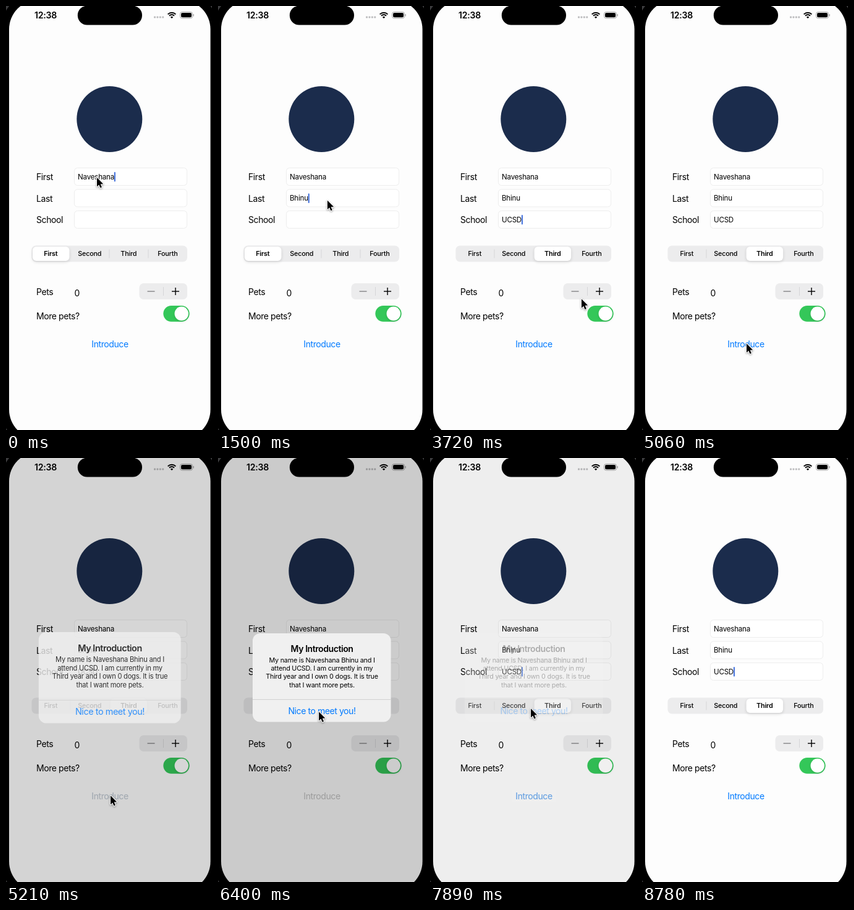
An HTML page with a canvas for the animation above (9.23 s loop, 333 by 682 pixels).

```html
<!DOCTYPE html>
<html lang="en">
<head>
<meta charset="utf-8">
<title>Introduction form</title>
<style>
  html, body { margin: 0; width: 100%; height: 100%; overflow: hidden; background: #000; }
  canvas { display: block; width: 100vw; height: 100vh; }
</style>
</head>
<body>
<canvas id="stage"></canvas>
<script>
const W = 333, H = 682, LOOP = 9230, STEP = 148.75;
const BLUE = '#007aff', GRAY = '#ececed', PAPER = '#fdfdfd';
const FIRST = 'Naveshana', LAST = 'Bhinu', SCHOOL = 'UCSD';
const canvas = document.getElementById('stage');
const ctx = canvas.getContext('2d');
const dpr = window.devicePixelRatio || 1;
canvas.width = W * dpr;
canvas.height = H * dpr;

const clamp = v => Math.min(1, Math.max(0, v));
const ramp = (t, from, to) => clamp((t - from) / (to - from));
const easeOut = u => 1 - (1 - u) ** 3;
const smooth = u => u * u * (3 - 2 * u);

const sampled = t => t < 291 ? 0 : 300 + Math.floor((t - 291) / STEP) * STEP;

function pointerAt(t) {
  let x = 147, y = 276;
  const glide = (from, to, toX, toY, ease = smooth) => {
    const u = ease(ramp(t, from, to));
    x += (toX - x) * u;
    y += (toY - y) * u;
  };
  glide(150, 600, 174, 302);
  glide(1350, 1790, 186, 347);
  glide(2080, 2670, 186, 371);
  glide(2670, 2970, 195, 396);
  glide(3270, 3870, 254, 485);
  glide(3870, 4460, 169, 543);
  glide(5360, 5950, 164, 444);
  glide(5950, 6850, 163, 403, easeOut);
  return [x, y];
}

// The pointer hides while keys are pressed and after the alert is gone.
const pointerHidden = t => t > 740 && t < 1480 || t > 2080 && t < 2670 || t > 8170;

const typed = (str, t, from, to) =>
  t < from ? '' : str.slice(0, 1 + Math.round((str.length - 1) * ramp(t, from, to) ** 2));

function caretAt(t) {
  const [field, since] = t < 590 ? [0, 0] : t < 1930 ? [1, 1200] : t < 7760 ? [2, 2380] : [2, 7770];
  return { field, alpha: clamp((560 - (t - since) % 1000) / 160) };
}

function box(x, y, w, h, r, fill, stroke) {
  ctx.beginPath();
  ctx.roundRect(x, y, w, h, r);
  if (fill) { ctx.fillStyle = fill; ctx.fill(); }
  if (stroke) { ctx.strokeStyle = stroke; ctx.lineWidth = 1; ctx.stroke(); }
}

function disc(x, y, r, fill) {
  ctx.beginPath();
  ctx.arc(x, y, r, 0, Math.PI * 2);
  ctx.fillStyle = fill;
  ctx.fill();
}

function line(x1, y1, x2, y2, color, width = 1) {
  ctx.beginPath();
  ctx.moveTo(x1, y1);
  ctx.lineTo(x2, y2);
  ctx.strokeStyle = color;
  ctx.lineWidth = width;
  ctx.stroke();
}

function text(str, x, y, { size = 14, weight = 400, color = '#000', align = 'left', track = -.42 } = {}) {
  ctx.font = `${weight} ${size}px Inter, sans-serif`;
  ctx.letterSpacing = track + 'px';
  ctx.textAlign = align;
  ctx.fillStyle = color;
  ctx.fillText(str, x, y);
  return ctx.measureText(str).width;
}

function shadowed(draw, blur, y, alpha) {
  ctx.save();
  ctx.shadowColor = `rgba(0,0,0,${alpha})`;
  ctx.shadowBlur = blur * dpr;
  ctx.shadowOffsetY = y * dpr;
  draw();
  ctx.restore();
}

function phone() {
  ctx.fillStyle = '#3c3c3e';
  ctx.fillRect(0, 0, W, H);
  box(-8, -22.5, 351.5, 731.5, 60, '#000');
  box(5, -9.5, 325.5, 705.5, 47, PAPER);
}

function statusBar() {
  text('12:38', 46, 20, { weight: 600, size: 14.2, track: -.3 });
  for (let i = 0; i < 4; i++) box(239 + i * 4.4, 16.5, 3, 3, 1, '#bdbdbf');
  ctx.strokeStyle = '#000';
  ctx.lineWidth = 2;
  for (const r of [9, 5.6]) {
    ctx.beginPath();
    ctx.arc(268, 19.7, r, Math.PI * 1.25, Math.PI * 1.75);
    ctx.stroke();
  }
  ctx.beginPath();
  ctx.moveTo(268, 20);
  ctx.arc(268, 20, 3, Math.PI * 1.25, Math.PI * 1.75);
  ctx.fillStyle = '#000';
  ctx.fill();
  box(281.5, 9.6, 20, 10.2, 3.2, null, '#a5a5a5');
  box(283, 11.1, 17, 7.2, 2, '#000');
  box(302.4, 13, 1.3, 3.6, .6, '#a5a5a5');
}

function fields(t) {
  const values = [FIRST, typed(LAST, t, 740, 1200), typed(SCHOOL, t, 2080, 2380)];
  const caret = caretAt(t);
  ['First', 'Last', 'School'].forEach((label, i) => {
    const y = 260.5 + i * 34.5;
    text(label, 49, y + 19.5);
    box(110.5, y, 182, 28, 5, '#fff', '#ededed');
    const width = text(values[i], 116, y + 18.2, { size: 11.6, track: -.22 });
    if (i === caret.field) {
      ctx.globalAlpha = caret.alpha;
      box(116 + width, y + 6.6, 1.8, 15.5, .8, '#2f62d9');
      ctx.globalAlpha = 1;
    }
  });
}

function segments(pos) {
  box(41.5, 385.5, 251.5, 26, 7, GRAY);
  for (let i = 1; i < 4; i++) {
    if (Math.abs(i - pos - .5) > .6) line(41 + i * 63, 391.5, 41 + i * 63, 405.5, '#d6d6d8');
  }
  shadowed(() => box(43 + pos * 62.8, 387, 59.5, 23, 6, '#fff'), 5, 1.8, .14);
  ['First', 'Second', 'Third', 'Fourth'].forEach((label, i) => {
    const weight = Math.abs(i - pos) < .5 ? 600 : 500;
    text(label, 72.3 + i * 63, 402.4, { size: 10.8, weight, align: 'center', track: -.2 });
  });
}

function form(t, shown) {
  disc(167.3, 182, 53, '#1b2c4c');
  fields(t);
  segments(2 * smooth(ramp(t, 2960, 3420)));

  text('Pets', 49, 464.8);
  text('0', 110.5, 467);
  box(215.5, 446, 77.5, 26, 7, GRAY);
  line(254.5, 452, 254.5, 466, '#d6d6d8');
  line(228.5, 459, 240.5, 459, '#858587', 1.4);
  line(268, 459, 280, 459, '#000', 1.4);
  line(274, 453, 274, 465, '#000', 1.4);

  text('More pets?', 49, 504.2);
  box(254.3, 482, 42.3, 25.7, 12.85, '#34c759');
  shadowed(() => disc(283.7, 494.8, 11.2, '#fff'), 4, 1.5, .12);

  text('Introduce', 168, 549, { align: 'center', color: BLUE });
  if (shown) {
    ctx.globalAlpha = shown;
    box(132, 534, 72, 20, 0, PAPER);
    text('Introduce', 168, 549, { align: 'center', color: '#c3c3c3' });
    ctx.globalAlpha = 1;
  }
}

function alertPanel(shown, scale) {
  ctx.save();
  ctx.globalAlpha = shown;
  ctx.translate(168, 353);
  ctx.scale(scale, scale);
  ctx.translate(-168, -353);
  box(56, 282, 223.5, 142.5, 12, '#f0f0f0');
  text('My Introduction', 168, 312, { weight: 600, align: 'center' });
  [
    `My name is ${FIRST} ${LAST} and I`,
    'attend UCSD. I am currently in my',
    'Third year and I own 0 dogs. It is true',
    'that I want more pets.'
  ].forEach((row, i) => text(row, 168, 328.8 + i * 13.3, { size: 10.8, align: 'center', track: -.22 }));
  line(56, 388.5, 279.5, 388.5, '#cfcfcf', .9);
  text('Nice to meet you!', 168, 411.7, { color: BLUE, align: 'center' });
  ctx.restore();
}

function arrow(x, y) {
  ctx.save();
  ctx.translate(x, y);
  ctx.beginPath();
  ctx.moveTo(0, 0);
  for (const [px, py] of [[0, 14.4], [3.3, 11.4], [5.5, 16.6], [7.9, 15.6], [5.7, 10.5], [10.2, 10.3]]) ctx.lineTo(px, py);
  ctx.closePath();
  ctx.lineJoin = 'round';
  ctx.strokeStyle = '#fff';
  ctx.lineWidth = 2;
  shadowed(() => ctx.stroke(), 3, 1, .4);
  ctx.fillStyle = '#000';
  ctx.fill();
  ctx.restore();
}

function draw(t) {
  const entered = easeOut(ramp(t, 5060, 5420));
  const shown = entered * (1 - easeOut(ramp(t, 7740, 8170)));
  ctx.setTransform(dpr, 0, 0, dpr, 0, 0);
  phone();
  form(t, shown);
  statusBar();
  ctx.fillStyle = `rgba(0,0,0,${.2 * shown})`;
  ctx.fillRect(5, 0, 325.5, H);
  box(115.8, -.4, 104.2, 30.8, 15.4, '#000');
  if (shown) alertPanel(shown, 1 + .14 * (1 - entered));
  if (!pointerHidden(t)) arrow(...pointerAt(t));
}

const start = performance.now();
function tick() {
  draw(sampled((performance.now() - start) % LOOP));
  requestAnimationFrame(tick);
}
tick();
</script>
</body>
</html>
```
